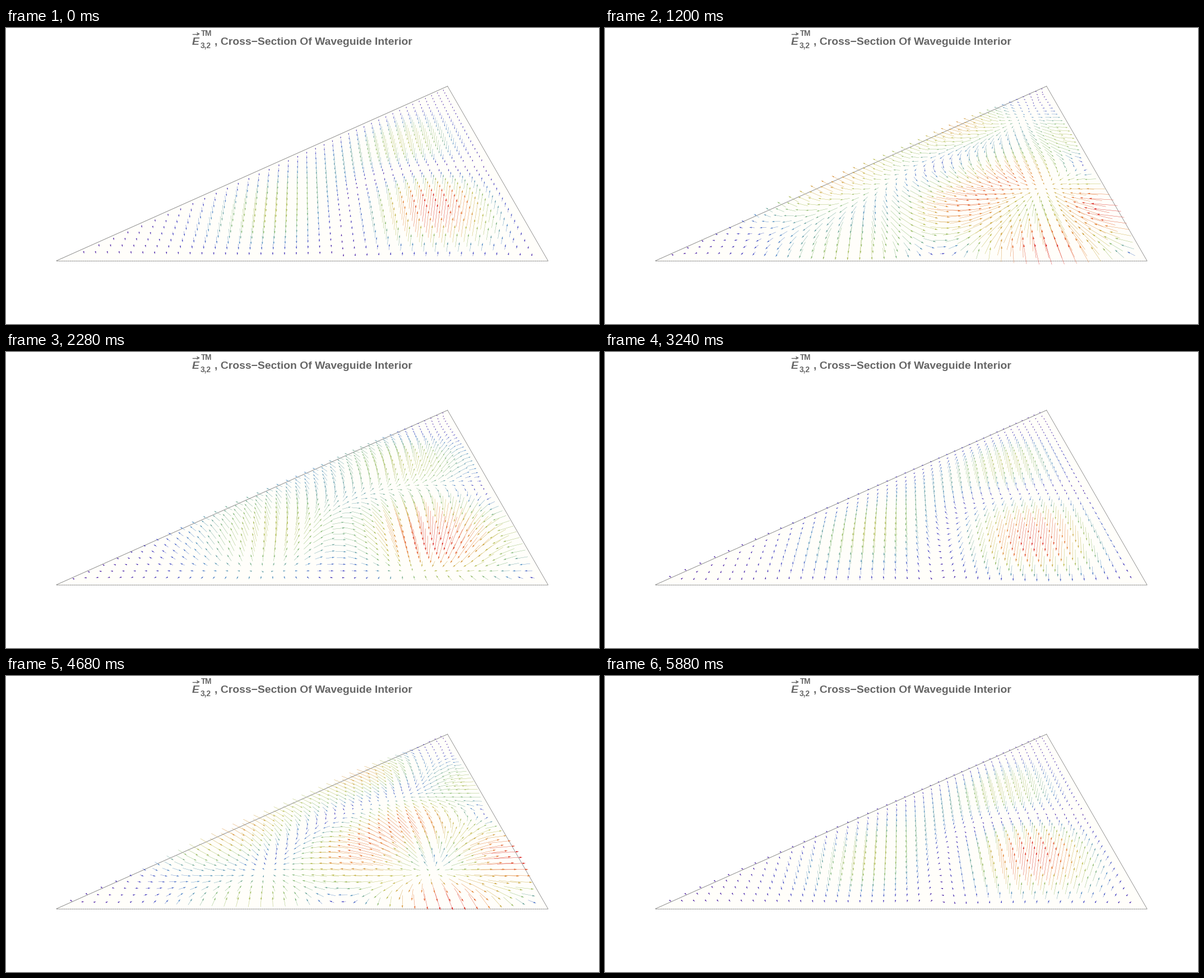
A matplotlib script that plays this animation: 1058x529 px, repeating every 6000 ms.

```python
import numpy as np
import matplotlib.pyplot as plt
from matplotlib.animation import FuncAnimation
from matplotlib.collections import LineCollection, PolyCollection
from matplotlib.colors import LinearSegmentedColormap

W, H, DPI = 1058, 529, 100
FRAMES, STEP_MS = 50, 120
PX = 72 / DPI

# Perspective view of a right isosceles triangle lying in the ground plane
CX, CY = W / 2 - 0.5, H / 2
BASE_Y, BASE_W = 416, 877
HORIZON = -347.4
DEPTH = 0.6912
SIN_T = (CY - HORIZON) * DEPTH / BASE_W
COS_T = np.sqrt(1 - SIN_T**2)
TAN_T = SIN_T / COS_T

N = 41
ARROW = 0.065          # world length of the strongest vector
TRANSVERSE = 0.0735    # transverse to axial amplitude
GRAY = "#666666"


def project(p):
    x, y, z = p.T
    q = 1 + DEPTH * y - DEPTH * TAN_T * z
    sx = CX + BASE_W * (x - 0.5) / q
    rise = (HORIZON - CY) * (1 + DEPTH * y) + BASE_Y - HORIZON
    sy = CY + (rise - BASE_W * COS_T * z) / q
    return np.column_stack([sx, sy])


def mode(x, y):
    """Axial field and its gradient for the (3, 2) mode."""
    a, b = 3 * np.pi, 2 * np.pi
    sin, cos = np.sin, np.cos
    psi = sin(a * x) * sin(b * y) - sin(b * x) * sin(a * y)
    dx = a * cos(a * x) * sin(b * y) - b * cos(b * x) * sin(a * y)
    dy = b * sin(a * x) * cos(b * y) - a * sin(b * x) * cos(a * y)
    return psi, dx, dy


row, col = np.mgrid[1:N, 1:N]
inside = col >= row
gx, gy = col[inside] / N, row[inside] / N
grid = np.column_stack([gx, gy, 0 * gx])
psi, psi_x, psi_y = mode(gx, gy)

rainbow = LinearSegmentedColormap.from_list("rainbow", [
    "#4a1aa0", "#3f40c4", "#4b8bc6", "#82ba70", "#bdbc48", "#e67f31", "#db2121"])

fig = plt.figure(figsize=(W / DPI, H / DPI), dpi=DPI, facecolor="white")
ax = fig.add_axes([0, 0, 1, 1])
ax.set_xlim(0, W)
ax.set_ylim(H, 0)
ax.axis("off")

# Waveguide outline
left, apex, right = project(np.array([(0, 0, 0), (1, 1, 0), (1, 0, 0)]))
ax.add_patch(plt.Polygon([left, apex, right], fc="#fffefa", ec="none", zorder=0))


def edge(a, b, color, style="-"):
    ax.plot(*zip(a, b), color=color, lw=0.8 * PX, ls=style, zorder=1)


edge(left, apex, "#777777")
edge(apex, right, "#858585")
edge(left, right, "#b4b4b4")
edge(left, right, "#777777", (0, (2.5, 1.7)))


# Title
def label(x, y, text, size, style="normal"):
    ax.text(x, y, text, family="Liberation Sans", weight="bold", style=style,
            size=size * PX, color=GRAY, ha="left", va="baseline")


label(331.5, 30, "E", 19.4, "italic")
label(347, 36, "3,2", 13.6)
label(347.5, 14, "TM", 13.6)
label(372.3, 30, ", Cross\u2212Section Of Waveguide Interior", 19.44)
ax.plot([333, 343], [10.5, 10.5], color=GRAY, lw=1.4 * PX)
ax.add_patch(plt.Polygon([(346, 10.5), (340, 7.3), (341.5, 10.5), (340, 13.7)],
                         fc=GRAY, ec="none"))

shafts = LineCollection([], linewidths=0.42 * PX, zorder=3, capstyle="butt")
heads = PolyCollection([], linewidths=0, zorder=4)
ax.add_collection(shafts, autolim=False)
ax.add_collection(heads, autolim=False)


def update(frame):
    phase = 2 * np.pi * frame / FRAMES
    axial, across = np.cos(phase), TRANSVERSE * np.sin(phase)
    field = np.column_stack([across * psi_x, across * psi_y, axial * psi])
    size = np.linalg.norm(field, axis=1)
    keep = size > 1e-9
    half = field[keep] / size.max() * ARROW / 2
    tail, tip = project(grid[keep] - half), project(grid[keep] + half)

    span = tip - tail
    length = np.linalg.norm(span, axis=1, keepdims=True)
    unit = span / np.maximum(length, 1e-9)
    normal = unit[:, ::-1] * (-1, 1)
    near = 1 / (1 + DEPTH * gy[keep, None])
    head = near * (4.4 + 0.03 * length)
    back, wing = tip - unit * head, normal * head * 0.25
    neck = tip - unit * np.minimum(head, length)

    colors = rainbow(size[keep] / size.max())
    shafts.set_segments(np.stack([tail, neck], axis=1))
    shafts.set_color(colors)
    heads.set_verts(np.stack([tip, back + wing, back - wing], axis=1))
    heads.set_facecolor(colors)
    return shafts, heads


anim = FuncAnimation(fig, update, frames=FRAMES, interval=STEP_MS,
                     repeat=True, repeat_delay=0, blit=False)
plt.show()
```
